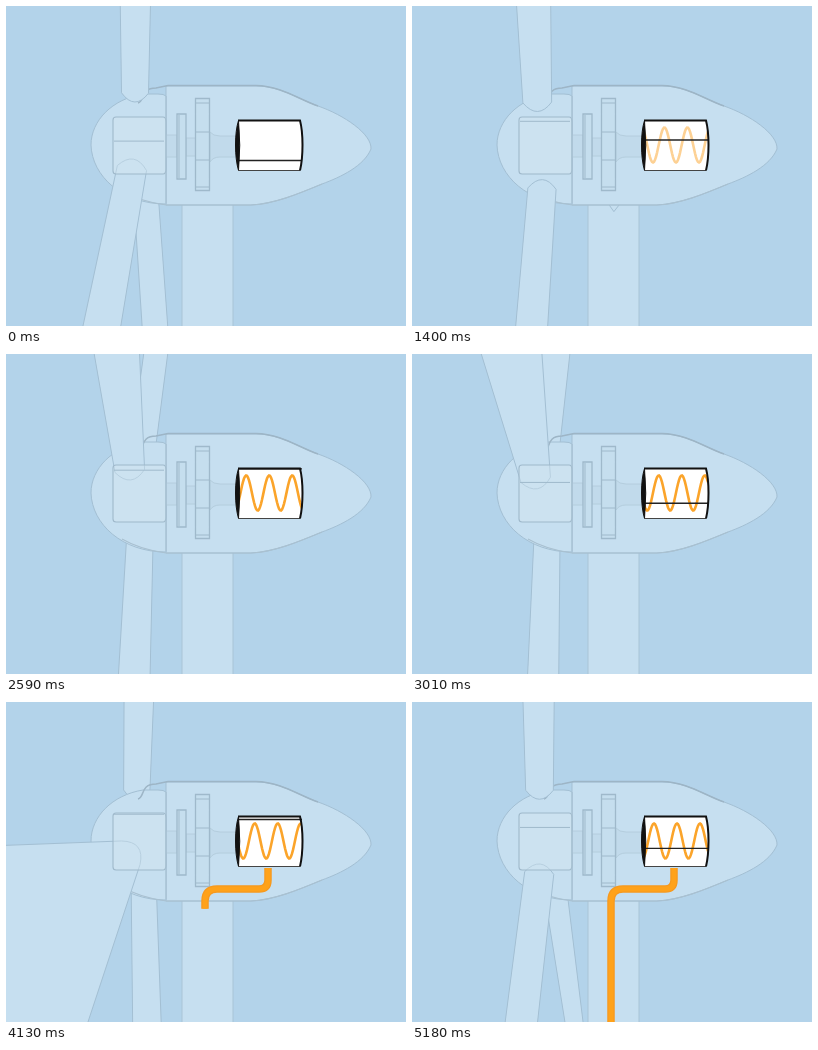
An HTML page with a canvas that plays this animation: 400 px wide and 320 px high, repeating every 5250 ms.

```html
<!DOCTYPE html>
<html>
<head>
<meta charset="utf-8">
<style>
html, body { margin: 0; width: 100%; height: 100%; overflow: hidden; background: #b3d3ea; }
canvas { display: block; }
</style>
</head>
<body>
<canvas id="stage" width="400" height="320"></canvas>
<script>
const ctx = document.getElementById('stage').getContext('2d');
const LOOP = 5250, STEP = 70, TURN = 14040;
const SKY = '#b3d3ea', BODY = '#c6dff0', LINE = '#a3bfd3', INNER = '#9fb9cb';
const HUB = { x: 125, y: 140 };
const rad = deg => deg * Math.PI / 180;

function paint(path, fill, stroke, width = 1) {
  const shape = typeof path === 'string' ? new Path2D(path) : path;
  if (fill) { ctx.fillStyle = fill; ctx.fill(shape); }
  if (stroke) { ctx.strokeStyle = stroke; ctx.lineWidth = width; ctx.stroke(shape); }
}

// Screen direction of a blade edge: the rotor plane seen almost edge-on, in perspective
function edge(angle, lag, depth, tilt) {
  const a = angle - rad(lag);
  const x = -depth * Math.sin(a) - tilt * Math.cos(a), y = -Math.cos(a);
  const size = Math.hypot(x, y);
  return { x: x / size, y: y / size };
}

// Angle in degrees: 0 points up, 90 towards the viewer, 270 away
function blade(deg) {
  const a = rad(deg), near = Math.sin(a);
  const lead = edge(a, 6 - 4 * near, 0.08, 0.05);
  const trail = edge(a, 11 + 5 * near, 0.07 - 0.025 * near, -0.06);
  const reach = Math.min(320, 90 + 0.22 * (deg - 283) ** 2);
  const far = (d, r = reach) => [HUB.x + d.x * r, HUB.y + d.y * r];

  const size = Math.hypot(lead.x + trail.x, lead.y + trail.y);
  const mid = { x: (lead.x + trail.x) / size, y: (lead.y + trail.y) / size };
  const rootX = 131 - 7 * near - 2 * Math.cos(a), rootY = 137 - 50 * Math.cos(a);
  const half = 13.5 + 1.5 * near;
  const path = new Path2D();
  path.moveTo(rootX + mid.y * half, rootY - mid.x * half);
  path.lineTo(...far(lead));
  path.quadraticCurveTo(...far(mid, reach + 8), ...far(trail));
  path.lineTo(rootX - mid.y * half, rootY + mid.x * half);
  path.quadraticCurveTo(rootX - mid.x * 18, rootY - mid.y * 18,
    rootX + mid.y * half, rootY - mid.x * half);
  paint(path, BODY, LINE);
}

function housing() {
  paint('M160 80 H250 C275 80 292 93 312 100 C338 109 366 128 365 143 C358 160 335 171 316 178 C292 188 268 198 245 199 H160 Z', BODY, LINE);
  paint('M160 90 Q158 88 152 88 H137 C106 93 85 115 85 139 C86 170 116 198 160 198 Z', BODY, LINE);
  paint('M132 97 C139 95 134 82 150 82 L162 79.5 H250 C275 80 292 93 312 100', null, '#9db5c6', 1.6);
  paint('M316 178 C292 188 268 198 245 199 H160 C145 197 128 192 116 185', null, '#a9c1d1', 1.2);
}

function gears(phi) {
  paint('M160 129 H171 V151 H160 Z M180 132 H190 V150 H180 Z M204 126 Q207 130 214 130 H230 V151 H214 Q207 151 204 156 Z', '#c1daeb', '#b4cddd');
  paint('M171 108 H180 V173 H171 Z M189.5 92.5 H203.5 V184.5 H189.5 Z', '#c5deee', INNER, 1.3);
  paint('M190 97 H203 M190 126 H203 M190 154 H203 M190 181 H203 M173 109 V172', null, INNER);
  paint('M110 111 H157 Q160 111 160 116 V163 Q160 168 157 168 H110 Q107 168 107 165 V114 Q107 111 110 111 Z', 'rgba(212,230,241,.4)', INNER, 1.1);
  paint('M160 90 V197', null, '#a9c2d3');
  const y = 139 - 28 * Math.cos(phi - Math.PI / 4);
  paint(`M108 ${y} H158`, null, INNER);
}

function generator(phi, frame) {
  const body = new Path2D('M232.5 114.5 H294 Q296.5 124 296.5 139 Q296.5 154 294 164.5 H232.5 Q229.5 154 229.5 139 Q229.5 124 232.5 114.5 Z');
  paint(body, '#fff');
  ctx.save();
  ctx.clip(body);
  ctx.globalAlpha = Math.min(1, Math.max(0, (frame * STEP - 1200) / 400));
  const peak = 244.7 + 8.75 * (frame - 27);
  const wave = new Path2D();
  for (let x = 231; x <= 296; x++) {
    wave.lineTo(x, 139 - 17.5 * Math.cos((x - peak) * 2 * Math.PI / 23));
  }
  paint(wave, null, '#fba42a', 2.6);
  ctx.restore();
  const y = 139.5 - 25 * Math.cos(phi);
  paint(`M232 ${y} H296`, null, '#222', 1.4);
  paint('M232.5 114.5 Q229.5 124 229.5 139 Q229.5 154 232.5 164.5 Q235 139 232.5 114.5 Z', '#111', '#111');
  paint('M232 164.5 H294', null, '#444');
  paint('M232 114.5 H294 Q296.5 124 296.5 139 Q296.5 154 294 164.5', null, '#111', 2);
}

function cable(time) {
  const length = (time - 3640) * 0.195;
  if (length <= 0) return;
  ctx.setLineDash([length, 999]);
  const path = 'M262 166 V178 Q262 187 253 187 H211 Q199 187 199 199 V330';
  paint(path, null, '#f6991f', 7.5);
  paint(path, null, '#ffa21a', 5);
  ctx.setLineDash([]);
}

function draw(now) {
  const frame = Math.floor(now % LOOP / STEP), time = frame * STEP;
  // The generator spins up a little after the start
  const phi = rad((127 + 14.6 * Math.min(frame, 13) + 17.2 * Math.max(frame - 13, 0)) % 180);
  const blades = [240, 120, 0].map(offset => (time / TURN * 360 + offset) % 360);
  const behind = deg => deg > 172;

  ctx.fillStyle = SKY;
  ctx.fillRect(0, 0, 400, 320);
  paint('M176 190 H227 V330 H176 Z', BODY, '#a9c4d6');
  blades.filter(behind).forEach(blade);
  housing();
  blades.filter(deg => !behind(deg)).forEach(blade);
  gears(phi);
  generator(phi, frame);
  cable(time);
}

const start = performance.now();
function tick() {
  draw(Math.max(0, performance.now() - start));
  requestAnimationFrame(tick);
}
tick();
</script>
</body>
</html>
```
